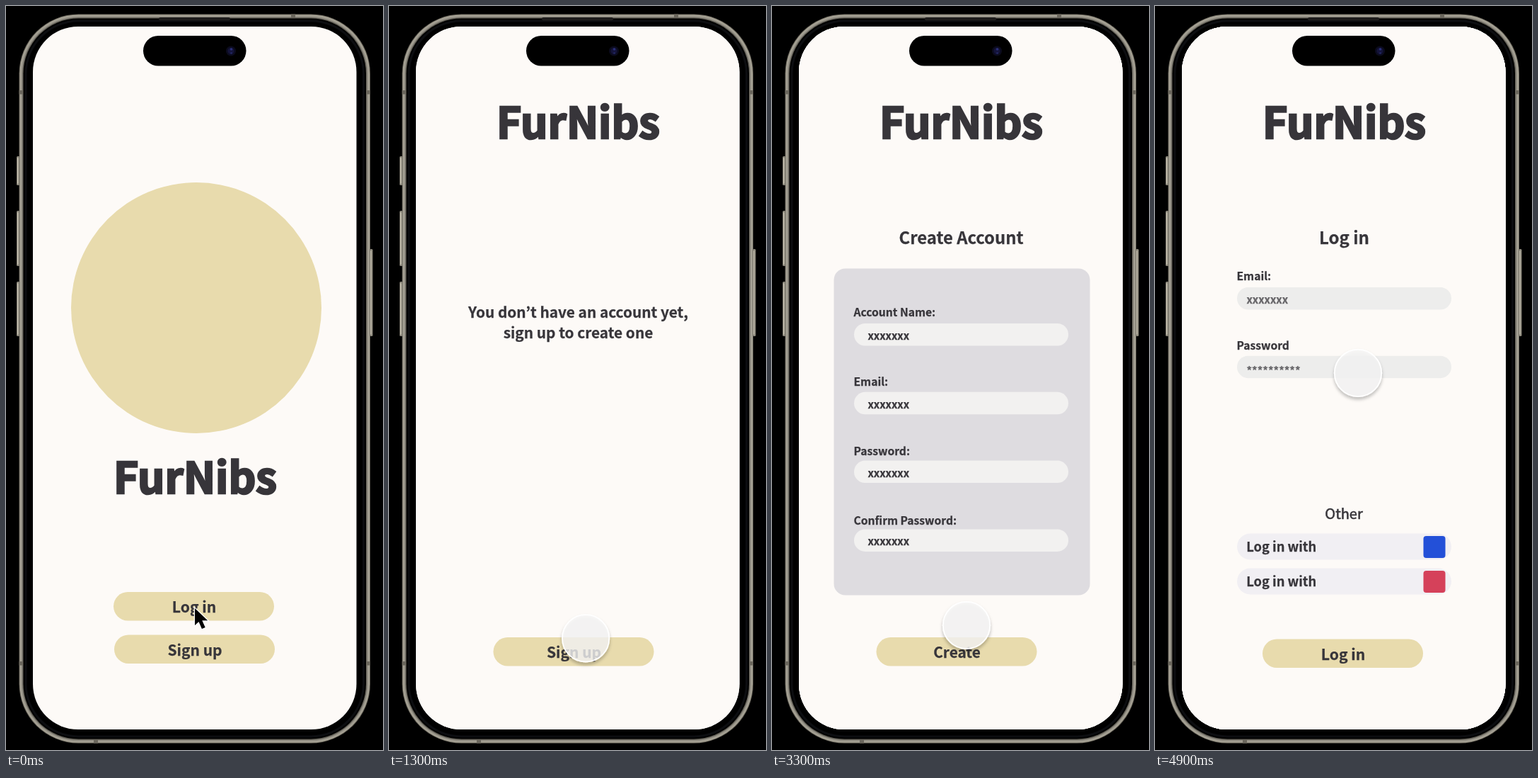
Write an HTML page that moves like this. It is 533x1050 px and loops after 5 s.

```html
<!DOCTYPE html>
<html lang="en">
<head>
<meta charset="utf-8">
<style>
  html, body { margin: 0; width: 100%; height: 100%; overflow: hidden; background: #000; }
  svg { display: block; width: 533px; height: 1050px; }
  text { font-family: "Noto Sans CJK JP", "Noto Sans CJK SC", "Noto Sans CJK", "Noto Sans", sans-serif; font-weight: 700; fill: #37353a; stroke: #37353a; stroke-width: .25; }
  .mid { text-anchor: middle; }
  .name { stroke-width: 2.6; }
  .light { font-weight: 500; stroke-width: .6; }
</style>
</head>
<body>
<svg id="stage" viewBox="0 0 533 1050"></svg>
<script>
const LOOP = 5000, FADE = 300, SAND = '#e8dbad';

const box = (x, y, w, h, r, fill) =>
  `<rect x="${x}" y="${y}" width="${w}" height="${h}" rx="${r}" fill="${fill}"/>`;
const text = (s, x, y, size, cls = '') =>
  `<text x="${x}" y="${y}" font-size="${size}" class="${cls}">${s}</text>`;
const mid = (s, y, size, x = 267.5) => text(s, x, y, size, 'mid');
const title = y => text('FurNibs', 267.5, y - .8, 60.4, 'mid name');
const button = (s, x, y, size) => box(x, y, 227, 40.5, 20.2, SAND) + mid(s, y + 29, size, x + 114);
const field = (y, fill) => box(116, y, 303, 31.5, 15.7, fill);

// Phone body
function phone() {
  const ring = (inset, fill) =>
    box(18.5 + inset, 11.5 + inset, 496.5 - 2 * inset, 1029 - 2 * inset, 84 - inset, fill);
  const key = (x, y, h) => box(x, y, 4.5, h, 1.5, '#8d897c') + box(x + 1, y + 2, 1.5, h - 4, .7, '#c3beae');
  const bands = [[18.5, 119], [508.5, 119], [18.5, 925], [508.5, 925]]
    .map(([x, y]) => box(x, y, 6.5, 5.5, 0, '#6b675d')).join('');
  return key(15, 212, 41) + key(15, 289, 78) + key(15, 389, 77) + key(514, 343, 123) +
    ring(0, '#6c685e') + ring(1, '#aaa698') + ring(2.5, '#99958a') + ring(4.5, '#68655c') +
    bands + box(403, 11.5, 6, 5, 0, '#6b675d') + box(124, 1035.5, 6, 5, 0, '#6b675d') +
    ring(6, '#000') + ring(8, '#0c0d10') + ring(11, '#000') +
    box(216, 16, 101, 4.5, 2.2, '#1d1c1b');
}

const island = box(194, 42, 145.5, 42.5, 21.2, '#000') +
  '<circle cx="318" cy="63.5" r="7" fill="#0b0b1d"/><circle cx="318" cy="63.5" r="4.5" fill="#14143a"/>' +
  '<circle cx="318.5" cy="61" r="1.8" fill="#2b2f78"/><circle cx="318.5" cy="66.5" r="1.4" fill="#22265f"/>';

const welcome = `<circle cx="269" cy="426" r="177" fill="${SAND}"/>` + title(689) +
  button('Log in', 152, 827, 21.1) + button('Sign up', 153, 887.5, 21);

const noAccount = title(188) + mid('You don’t have an account yet,', 440, 20.8) +
  mid('sign up to create one', 469, 20.8) + button('Sign up', 147.5, 891, 21);

function create(filled) {
  const labels = ['Account Name:', 'Email:', 'Password:', 'Confirm Password:'];
  const rows = labels.map((s, i) => {
    const y = 448 + 96.8 * i;
    return text(s, 115.5, 438.3 + 97.8 * i, 15.65) + field(y, '#f2f1f0') +
      (filled ? text('xxxxxxx', 135.5, y + 23, 14.9) : '');
  });
  return title(188) + mid('Create Account', 336, 23.8) +
    box(87.5, 370.5, 362, 461, 16, '#dedce0') + rows.join('') + button('Create', 147.5, 891, 20.8);
}

function login(filled) {
  const other = (y, fill) => box(116, y, 303, 37, 18.5, '#f1eff3') +
    text('Log in with', 129.3, y + 25.5, 18.3) + box(379.5, y + 3.5, 31, 31, 4, fill);
  return title(188) + mid('Log in', 336, 24) +
    text('Email:', 115.5, 387, 15.65) + field(397, '#ededec') +
    text('Password', 115.5, 485, 15.65) + field(493.7, '#ededec') +
    (filled ? text('xxxxxxx', 129.5, 419.5, 14.9) + text('**********', 129.5, 520, 15) : '') +
    text('Other', 267, 724, 20, 'mid light') +
    other(744.5, '#2350d8') + other(793.5, '#d5415a') + button('Log in', 152, 893.5, 21.1);
}

// Each screen dissolves in over the previous one
const screens = [
  [-FADE, welcome], [363, noAccount], [1835, create(false)],
  [2800, create(true)], [3550, login(false)], [4750, login(true)]
];

// Pointer stops: time, x, y
const path = [
  [0, 267, 853], [900, 267, 853], [1500, 282, 906], [2050, 282, 906], [2600, 277, 751],
  [2950, 277, 751], [3300, 275, 874], [3420, 273, 908], [3650, 273, 908],
  [4000, 257, 716], [4450, 287, 518], [LOOP, 287, 518]
];

const stage = document.getElementById('stage');
stage.innerHTML = `<defs><filter id="shadow" x="-30%" y="-30%" width="160%" height="170%">
    <feDropShadow dx="0" dy="3.5" stdDeviation="2.2" flood-color="#000" flood-opacity=".28"/></filter></defs>` +
  phone() +
  screens.map(([, art]) => `<g class="screen">${box(38, 29, 457.5, 992, 64, '#fdfaf7')}${art}</g>`).join('') +
  island +
  `<path id="arrow" d="M267 850v24l5.5-5 4.4 10 4.8-2-4.4-9.7h7.9z" fill="#000" stroke="#fff" stroke-width="2.4" paint-order="stroke"/>
   <g id="touch"><circle r="33.2" fill="#f8f8f8" fill-opacity=".76" stroke="#fff" stroke-width="1.8" filter="url(#shadow)"/></g>`;

const layers = [...stage.querySelectorAll('.screen')];
const arrow = document.getElementById('arrow');
const touch = document.getElementById('touch');
const clamp = v => Math.min(1, Math.max(0, v));
const easeOut = v => 1 - (1 - v) ** 1.9;
const smooth = v => v * v * (3 - 2 * v);

function pointer(t) {
  const i = path.findIndex(p => p[0] > t);
  const [t0, x0, y0] = path[i - 1], [t1, x1, y1] = path[i];
  const k = smooth((t - t0) / (t1 - t0));
  return [x0 + (x1 - x0) * k, y0 + (y1 - y0) * k];
}

function draw(now) {
  const t = now % LOOP;
  layers.forEach((g, i) => {
    const k = easeOut(clamp((t - screens[i][0]) / FADE));
    g.setAttribute('opacity', k);
    g.setAttribute('display', k ? 'inline' : 'none');
  });
  const pressed = t >= 100;
  arrow.setAttribute('display', pressed ? 'none' : 'inline');
  touch.setAttribute('display', pressed ? 'inline' : 'none');
  touch.setAttribute('transform', `translate(${pointer(t)})`);
}

const start = performance.now();
function tick() {
  draw(performance.now() - start);
  requestAnimationFrame(tick);
}
tick();
</script>
</body>
</html>
```
